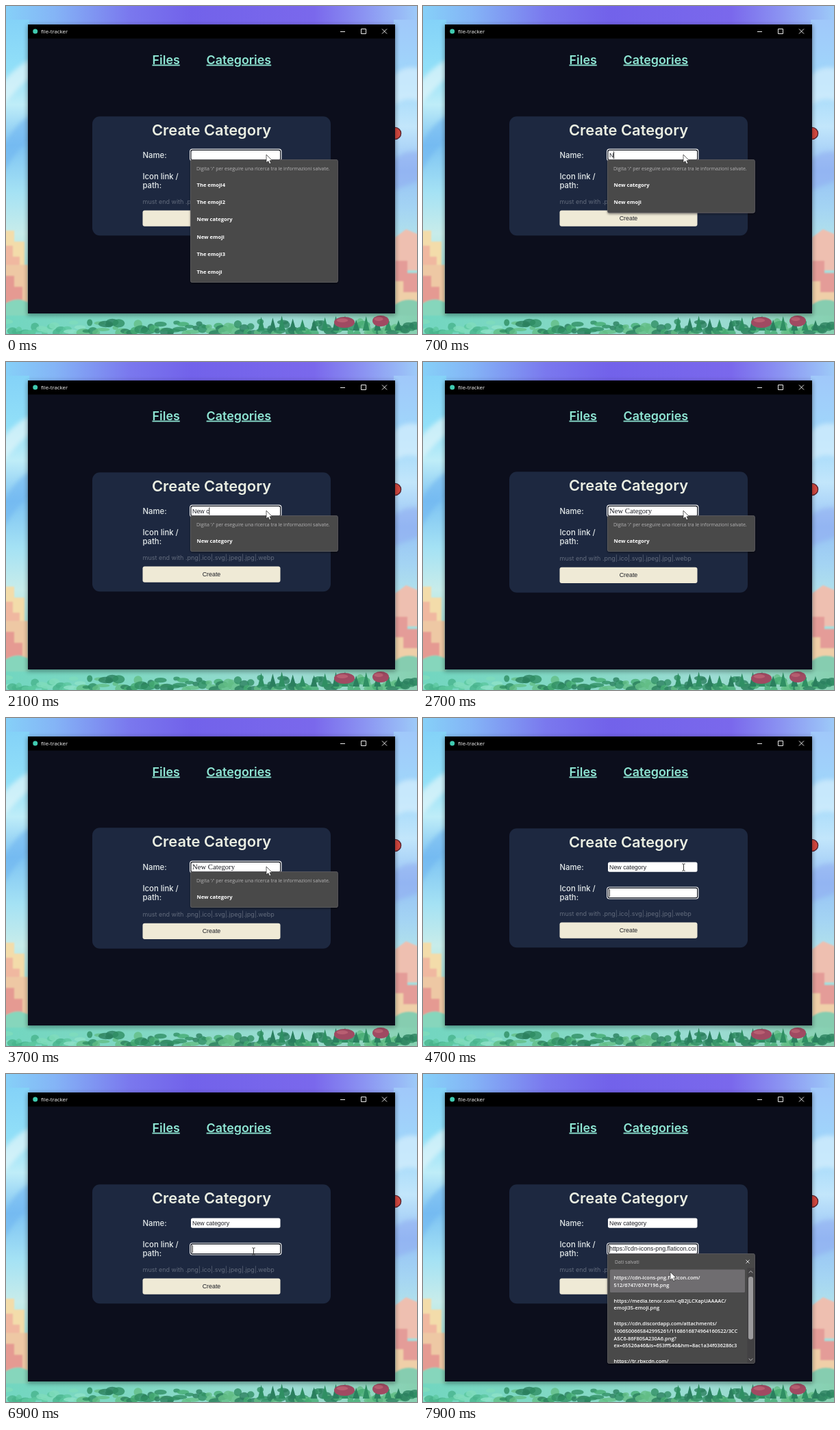
Recreate the animation shown at these times as an HTML page. Size 600x479 px, loop 8 s.

```html
<!DOCTYPE html>
<html lang="en">
<head>
<meta charset="utf-8">
<title>file-tracker</title>
<style>
  html, body { margin: 0; width: 100%; height: 100%; overflow: hidden; background: #0c0e1c; }
  svg { display: block; width: 100%; height: 100%; }
  text { white-space: pre; }
  .ui { font-family: Inter, sans-serif; font-weight: 500; fill: #e6ecec; }
  .link { font-size: 17.9px; font-weight: 600; fill: #8ee5d3; text-decoration: underline; text-decoration-thickness: 1.4px; }
  .heading { font-size: 21.9px; font-weight: 600; fill: #eaeee2; }
  .label { font-size: 11.3px; }
  .hint { font-size: 9px; font-weight: 400; fill: #626b7c; }
  .sans { font-family: "Liberation Sans", Arial, sans-serif; font-size: 8.85px; fill: #1d1f26; }
  .serif { font-family: "Liberation Serif", Times, serif; font-size: 10.7px; fill: #16181f; }
  .sys { font-family: "Open Sans", "Noto Sans", sans-serif; font-size: 7px; fill: #b4b3b4; }
  .caption { font-size: 7.9px; font-weight: 500; fill: #f4f4f4; }
  .item { font-size: 7.6px; font-weight: 700; fill: #fff; }
  .url { font-size: 7.45px; font-weight: 600; fill: #fff; }
  .popup { fill: #49484a; stroke: #656466; stroke-width: .8; filter: url(#drop); }
  .ring { fill: none; stroke: #f4f4f4; stroke-width: 1.2; }
</style>
</head>
<body>
<svg viewBox="0 0 600 479" preserveAspectRatio="none">
  <defs>
    <linearGradient id="sky">
      <stop offset="0" stop-color="#86d0f8"/>
      <stop offset=".12" stop-color="#84b4f6"/>
      <stop offset=".3" stop-color="#7a78ee"/>
      <stop offset=".45" stop-color="#7262ea"/>
      <stop offset=".75" stop-color="#7a68ec"/>
      <stop offset=".87" stop-color="#8b93f2"/>
      <stop offset="1" stop-color="#9dcaf8"/>
    </linearGradient>
    <linearGradient id="left" x2="0" y2="1">
      <stop offset="0" stop-color="#84d2f8"/>
      <stop offset=".16" stop-color="#92e0f8"/>
      <stop offset=".27" stop-color="#bfedf8"/>
      <stop offset=".4" stop-color="#7fc4f3"/>
      <stop offset=".55" stop-color="#a5e2f4"/>
      <stop offset=".68" stop-color="#c8ecea"/>
      <stop offset="1" stop-color="#7cd9c6"/>
    </linearGradient>
    <linearGradient id="right" x2="0" y2="1">
      <stop offset="0" stop-color="#a0c8fa"/>
      <stop offset=".2" stop-color="#a0d8fa"/>
      <stop offset=".34" stop-color="#c2e6fb"/>
      <stop offset=".48" stop-color="#96c2f5"/>
      <stop offset=".6" stop-color="#a4d4f3"/>
      <stop offset=".7" stop-color="#b2e2ea"/>
      <stop offset="1" stop-color="#8ad9c4"/>
    </linearGradient>
    <linearGradient id="ground">
      <stop offset="0" stop-color="#72d6c0"/>
      <stop offset=".35" stop-color="#82d8c4"/>
      <stop offset=".7" stop-color="#9cdcd4"/>
      <stop offset="1" stop-color="#86d0b0"/>
    </linearGradient>
    <filter id="soft" x="-20%" y="-20%" width="140%" height="140%"><feGaussianBlur stdDeviation="3"/></filter>
    <filter id="hazy"><feGaussianBlur stdDeviation="1"/></filter>
    <filter id="drop" x="-10%" y="-10%" width="120%" height="125%">
      <feDropShadow dx="0" dy="1.5" stdDeviation="1.8" flood-opacity=".45"/>
    </filter>
    <clipPath id="nameClip"><rect x="270" y="210" width="130" height="15"/></clipPath>
    <clipPath id="iconClip"><rect x="271" y="248" width="127" height="15"/></clipPath>
    <clipPath id="savedClip"><rect x="269" y="283" width="216" height="139"/></clipPath>
  </defs>

  <!-- wallpaper -->
  <rect width="600" height="479" fill="url(#sky)"/>
  <rect y="20" width="34" height="459" fill="url(#left)"/>
  <rect x="566" y="20" width="34" height="459" fill="url(#right)"/>
  <rect y="447" width="600" height="32" fill="url(#ground)"/>
  <g filter="url(#soft)">
    <path d="M-5 112Q14 88 36 78V104Q14 122-5 146Z" fill="#e2f6fa" opacity=".7"/>
    <path d="M-5 206Q16 168 36 160V196Q14 210-5 246Z" fill="#6fb4f0" opacity=".6"/>
    <path d="M564 104Q580 84 606 92V140Q584 130 564 146Z" fill="#d8effc" opacity=".7"/>
    <path d="M564 226Q584 208 606 214V254Q584 262 564 270Z" fill="#8fa8f0" opacity=".5"/>
  </g>
  <g filter="url(#hazy)">
    <path d="M-3 328H12V344H27V380H-3Z" fill="#f3dcaa"/>
    <path d="M-3 350H10V366H20V382H-3Z" fill="#f0b8a0"/>
    <path d="M-3 378H32V434H-3Z" fill="#eec8a4"/>
    <path d="M-3 394H12V410H24V436H-3Z" fill="#e59a92"/>
    <path d="M-3 436Q16 422 34 434V452H-3Z" fill="#86d6bc"/>
    <path d="M568 338L584 326L603 334V386H568Z" fill="#eebfb0"/>
    <path d="M568 372H586V390H603V436H568Z" fill="#e49c98"/>
    <path d="M568 402H580V418H603V440H568Z" fill="#efcfa8"/>
    <path d="M568 436Q584 424 603 432V452H568Z" fill="#86cdb0"/>
  </g>
  <circle cx="568" cy="186" r="8.6" fill="#d4483f" stroke="#58242f" stroke-width="1.4"/>
  <g id="bushes"></g>

  <!-- window -->
  <rect x="31" y="28" width="538" height="424" opacity=".35" filter="url(#soft)"/>
  <rect x="32" y="27" width="536" height="422" fill="#0c0e1c"/>
  <rect x="32" y="27" width="536" height="20.5" fill="#000"/>
  <circle cx="42.7" cy="37" r="3.5" fill="#40cbb0"/>
  <text class="sys caption" x="51" y="39.8">file-tracker</text>
  <path d="M488 37.5H495M518.5 33.5H525.5V40.5H518.5ZM549 33.5L556 40.5M556 33.5L549 40.5" fill="none" stroke="#e8e8e8"/>

  <g class="ui">
    <text class="link" x="213.5" y="84.6">Files</text>
    <text class="link" x="292.6" y="84.6">Categories</text>
    <rect id="card" x="126" width="348" rx="11" fill="#1d2840"/>
    <text id="heading" class="heading" x="300" text-anchor="middle">Create Category</text>
    <text class="label" x="199.5" y="221.5">Name:</text>
    <text class="label" x="199.5" y="253.3">Icon link /</text>
    <text class="label" x="199.5" y="265.7">path:</text>
  </g>
  <g id="lower">
    <text class="ui hint" x="199.5" y="289.2">must end with .png|.ico|.svg|.jpeg|.jpg|.webp</text>
    <rect x="199.5" y="298.5" width="201" height="23.3" rx="3" fill="#efead6"/>
    <text class="sans" x="300" y="313" text-anchor="middle">Create</text>
  </g>

  <rect x="270" y="210.5" width="130.5" height="14.2" rx="2.5" fill="#fff"/>
  <rect x="270" y="248.5" width="130.5" height="14" rx="2.5" fill="#fff"/>
  <g id="ring">
    <rect class="ring" x="269.9" y="210.3" width="130.8" height="14.6" rx="2.5" style="stroke:#11141d"/>
    <rect class="ring" x="268.7" y="209.1" width="133.2" height="17" rx="3.4"/>
  </g>
  <text id="name" y="220.9" x="272" clip-path="url(#nameClip)"></text>
  <text id="icon" class="sans" x="272" y="258.4" clip-path="url(#iconClip)">https://cdn-icons-png.flaticon.com/512/6747/6747196.png</text>
  <rect id="caret" width=".9" height="11" fill="#111"/>

  <!-- suggestions for the name -->
  <g id="suggest">
    <rect id="suggestBox" class="popup" x="269.4" y="224.4" width="215" rx="2.5"/>
    <text class="sys" x="278" y="239.6">Digita '/' per eseguire una ricerca tra le informazioni salvate.</text>
    <g id="items"></g>
  </g>

  <!-- saved addresses -->
  <g id="saved">
    <rect class="popup" x="269.4" y="262.4" width="215" height="160.2" rx="2.5"/>
    <text class="sys" x="280" y="276.7">Dati salvati</text>
    <path d="M471.5 271.5L476.5 276.5M476.5 271.5L471.5 276.5" stroke="#e2e2e2" stroke-width=".9"/>
    <rect id="hover" x="273" y="285.5" width="197" height="33.5" rx="1.5" fill="#6f6d70"/>
    <g id="urls" clip-path="url(#savedClip)"></g>
    <rect x="473.5" y="283" width="10" height="139" fill="#424143"/>
    <rect x="475" y="296" width="7" height="91.5" rx="3" fill="#9c9b9d"/>
    <path d="M475.8 290.5L478.5 287.5L481.2 290.5M475.8 415.5L478.5 418.5L481.2 415.5" fill="none" stroke="#b5b4b6"/>
  </g>

  <path id="arrow" d="M0 0V12L2.8 9.5L4.7 13.6L6.8 12.6L5 8.7H8.6Z" fill="#fff" stroke="#222" stroke-width=".7"/>
  <path id="beam" d="M-2.2-5H-.6L0-4.4L.6-5H2.2M0-4.4V4.4M-2.2 5H-.6L0 4.4L.6 5H2.2" fill="none" stroke="#333" stroke-width="1"/>
</svg>

<script>
const LOOP = 8000, BLINK = 1060;
const $ = id => document.getElementById(id);
const show = (id, on) => $(id).setAttribute("display", on ? "inline" : "none");
const set = (id, attrs) => { for (const k in attrs) $(id).setAttribute(k, attrs[k]); };

function add(parent, tag, attrs, text = "") {
  const el = document.createElementNS("http://www.w3.org/2000/svg", tag);
  for (const k in attrs) el.setAttribute(k, attrs[k]);
  el.textContent = text;
  parent.append(el);
}

// times of the events
const T = { preview: 2300, accept: 4400, tab: 4600, open: 7250, hover: 7550 };
const typing = [[0, ""], [600, "N"], [800, "Ne"], [1000, "New"], [1800, "New "], [2000, "New c"]];
const entries = ["The emoji4", "The emoji2", "New category", "New emoji", "The emoji3", "The emoji"];
const path = [[0, 380, 217], [5200, 380, 217], [5900, 361, 258], [7300, 361, 258], [7700, 361, 289]];

const addresses = [
  [300, "https://cdn-icons-png.flaticon.com/", "512/6747/6747196.png"],
  [333.6, "https://media.tenor.com/-qB2JLCXapUAAAAC/", "emoji35-emoji.png"],
  [367, "https://cdn.discordapp.com/attachments/", "1006500665842995261/1168616874964160522/3CC",
    "A5C6-86F805A230A6.png?", "ex=65526a46&is=653ff546&hm=8ac1a34f036286c3"],
  [422, "https://tr.rbxcdn.com/"]
];
for (const [y, ...lines] of addresses)
  lines.forEach((s, i) => add($("urls"), "text", { class: "sys url", x: 278.5, y: y + i * 10.8 }, s));

function plant() {
  let seed = 7;
  const rnd = () => (seed = seed * 16807 % 2147483647) / 2147483647;
  const pale = ["#7fdcbc", "#5cc8a0", "#48b48c", "#8fe2c8"];
  const deep = ["#2f8f63", "#45ab72", "#2a7f5e", "#63be86"];
  const g = $("bushes");
  for (let i = 0; i < 130; i++) {
    const x = i * 4.7, shades = x < 110 ? pale : deep;
    add(g, "ellipse", {
      cx: x, cy: 461 + rnd() * 18, rx: 4 + rnd() * 7, ry: 2.5 + rnd() * 4,
      fill: shades[Math.floor(rnd() * 4)], opacity: .8
    });
  }
  for (let i = 0; i < 14; i++) {
    const x = 372 + i * 15 + rnd() * 6, h = 15 + rnd() * 8;
    add(g, "path", { d: `M${x} ${474 - h}l5 ${h}h-10Z`, fill: deep[i % 2 * 2] });
  }
  for (const [x, y, rx] of [[494, 462, 15], [547, 460, 12]]) {
    add(g, "ellipse", { cx: x, cy: y, rx, ry: 8, fill: "#a04a62" });
    add(g, "ellipse", { cx: x - 3, cy: y - 3, rx: rx * .55, ry: 3, fill: "#b95f72" });
  }
}

function pointer(t) {
  let i = path.length - 1;
  while (path[i][0] > t) i--;
  const a = path[i], b = path[i + 1] || a;
  const u = b === a ? 0 : (t - a[0]) / (b[0] - a[0]);
  const e = u * u * (3 - 2 * u);
  return [a[1] + (b[1] - a[1]) * e, a[2] + (b[2] - a[2]) * e];
}

let listed = "";
function fillList(typed) {
  const rows = entries.filter(s => s.toLowerCase().startsWith(typed.toLowerCase()));
  const key = rows.join();
  if (key === listed) return;
  listed = key;
  $("items").replaceChildren();
  rows.forEach((s, i) => add($("items"), "text", { class: "sys item", x: 278.5, y: 263.5 + i * 25.4 }, s));
  set("suggestBox", { height: 26.8 + rows.length * 25.4 });
}

function render(t) {
  const [typedAt, typed] = typing.filter(s => s[0] <= t).pop();
  const preview = t >= T.preview && t < T.accept;
  const accepted = t >= T.accept, onIcon = t >= T.tab;
  const open = t >= T.open, hover = t >= T.hover;

  // the serif preview makes the row slightly taller
  set("card", { y: preview ? 160.3 : 161.3, height: preview ? 176.5 : 174 });
  set("heading", { y: preview ? 188.4 : 189 });
  set("lower", { transform: `translate(0 ${preview ? 1.2 : 0})` });

  $("name").textContent = preview ? "New Category" : accepted ? "New category" : typed;
  set("name", { class: preview ? "serif" : "sans" });
  fillList(typed);
  show("suggest", !accepted);
  set("ring", { transform: `translate(0 ${onIcon ? 37.9 : 0})` });
  show("icon", hover);
  show("saved", open);
  show("hover", hover);

  const since = onIcon ? t - T.tab : accepted ? t - T.accept : typedAt ? t - typedAt : t + 600;
  show("caret", !preview && since % BLINK < BLINK / 2);
  const width = onIcon || !$("name").textContent ? 0 : $("name").getComputedTextLength();
  set("caret", { x: 271.8 + width, y: onIcon ? 250 : 212.2 });

  const [x, y] = pointer(t);
  const beam = accepted && y < 264;
  show("beam", beam);
  show("arrow", !beam);
  set("arrow", { transform: `translate(${x} ${y})` });
  set("beam", { transform: `translate(${x + .5} ${y + 1})` });
}

plant();
const start = performance.now();
function tick() {
  render((performance.now() - start) % LOOP);
  requestAnimationFrame(tick);
}
tick();
</script>
</body>
</html>
```
